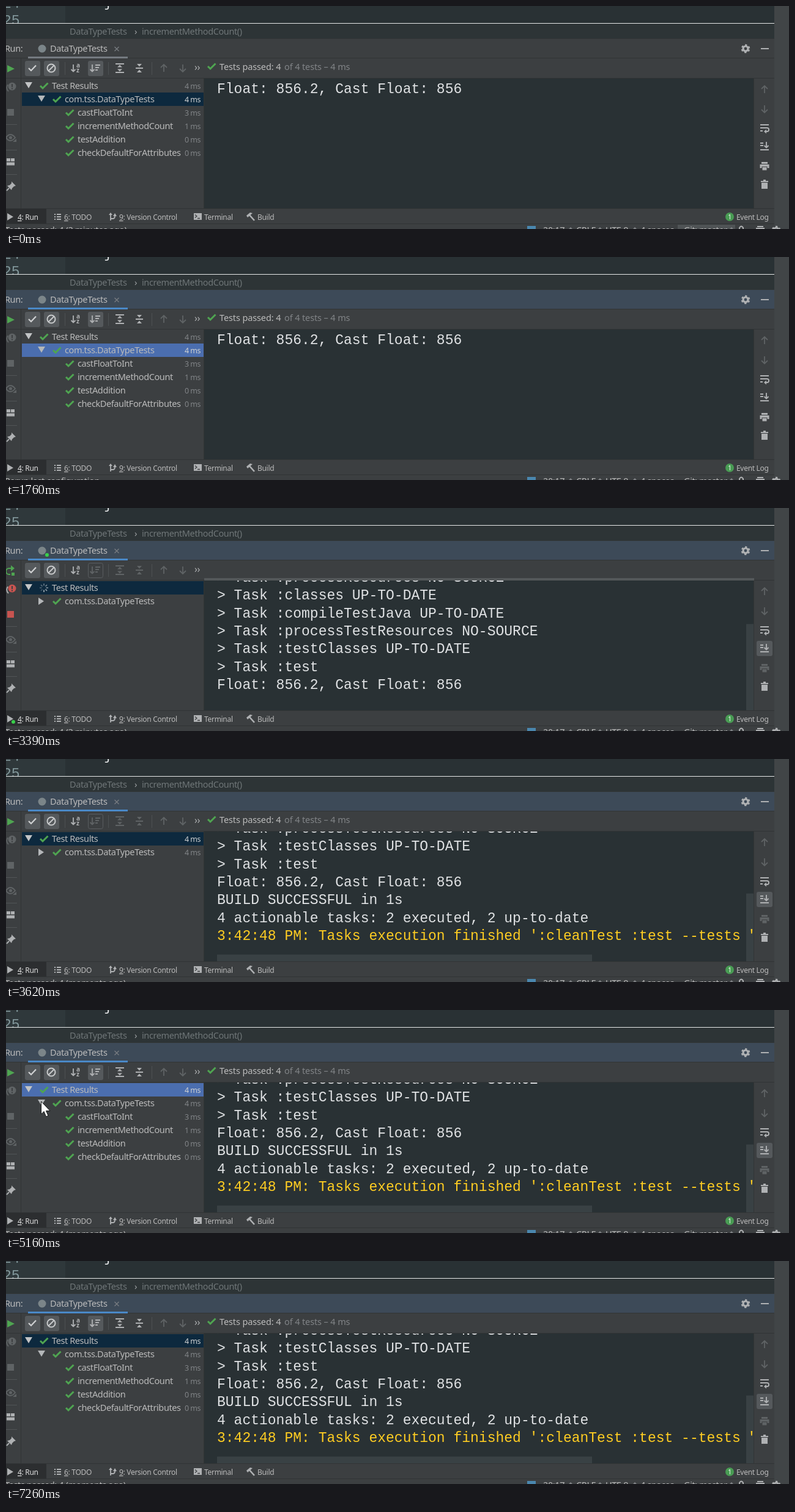
Write an HTML page that moves like this. It is 1280 px wide and 366 px high and loops after 7340 ms.

```html
<!DOCTYPE html>
<html lang="en">
<head>
<meta charset="utf-8">
<title>Test runner panel</title>
<style>
html, body { margin: 0; width: 100%; height: 100%; overflow: hidden; background: #3c3f41; }
svg { display: block; width: 1280px; height: 366px; }
text { font: 14.5px "Noto Sans", sans-serif; letter-spacing: -.4px; white-space: pre; }
.summary { letter-spacing: -.12px; }
.time { font-size: 12.5px; letter-spacing: -.5px; }
.tab { font-size: 12px; letter-spacing: -.3px; }
.mono { font: 23px "Liberation Mono", monospace; letter-spacing: 0; }
</style>
</head>
<body>
<svg id="stage" viewBox="0 0 1280 366" xmlns="http://www.w3.org/2000/svg"></svg>
<script>
const LOOP = 7340;
const PANEL = '#3c3f41', DARK = '#293134', EDGE = '#313435', TEXT = '#bbbbbb', DIM = '#818487';
const ICON = '#afb1b3', OFF = '#5f6365', GREEN = '#4fa551', RED = '#c75450', BLUE = '#4b6eaf', THUMB = '#394144';
const LINE = 29.4, VIEW = 215;

const rect = (x, y, w, h, fill, more = '') =>
  `<rect x="${x}" y="${y}" width="${w}" height="${h}" fill="${fill}" ${more}/>`;
const text = (x, y, s, fill = TEXT, more = '') => `<text x="${x}" y="${y}" fill="${fill}" ${more}>${s}</text>`;
const mono = (x, y, s, fill = '#e0e2e4') => text(x, y, s, fill, 'class="mono"');
const stroke = (d, color = ICON, w = 2) => `<path d="${d}" fill="none" stroke="${color}" stroke-width="${w}"/>`;
const fill = (d, color = ICON) => `<path d="${d}" fill="${color}"/>`;
const dot = (x, y, r, color) => `<circle cx="${x}" cy="${y}" r="${r}" fill="${color}"/>`;
const at = (x, y, s) => `<g transform="translate(${x} ${y})">${s}</g>`;
const check = (x, y) => at(x, y, stroke('M-6 0L-2 4L6.5-4.5', GREEN, 3));
const arrow = (x, y, dir, color) =>
  at(x, y, stroke(`M0 ${-6 * dir}V${5 * dir}M-5 ${dir}L0 ${6 * dir}L5 ${dir}`, color, 1.8));
const button = (x, y, w = 25) => rect(x, y, w, 25, '#55595c', 'rx="3"');
const gear = (x, y) => at(x, y,
  `<circle r="4" fill="none" stroke="${ICON}" stroke-width="3.2"/>` +
  `<circle r="6" fill="none" stroke="${ICON}" stroke-width="2.6" stroke-dasharray="3.14" transform="rotate(15)"/>`);

const LOG = [
  'Testing started at 3:42 PM ...',
  '&gt; Task :cleanTest',
  '&gt; Task :compileJava UP-TO-DATE',
  '&gt; Task :processResources NO-SOURCE',
  '&gt; Task :classes UP-TO-DATE',
  '&gt; Task :compileTestJava UP-TO-DATE',
  '&gt; Task :processTestResources NO-SOURCE',
  '&gt; Task :testClasses UP-TO-DATE',
  '&gt; Task :test',
  'Float: 856.2, Cast Float: 856',
  'BUILD SUCCESSFUL in 1s',
  '4 actionable tasks: 2 executed, 2 up-to-date',
  '3:42:48 PM: Tasks execution finished \':cleanTest :test --tests "com.tss.DataTypeTests"\'.'
];
const TESTS = [['castFloatToInt', 3], ['incrementMethodCount', 1], ['testAddition', 0], ['checkDefaultForAttributes', 0]];

// Step lists: the last entry whose time has come applies.
const COUNT = [[0, 0], [2220, 2], [2290, 4], [2370, 6], [2440, 8], [3160, 9], [3240, 10], [3400, 12], [3480, 13]];
const STATUS = [[0, 'Tests passed: 4 (3 minutes ago)'], [1130, 'Rerun last configuration'],
  [2610, 'Tests passed: 4 (3 minutes ago)'], [3560, 'Tests passed: 4 (moments ago)']];
const POINTER = [[0], [210, 1120, 290], [290, 1110, 131], [370],
  [4010, 60, 330], [4090, 36, 250], [4170, 18, 170], [4240, 8, 118], [4320, 4, 98], [4460, 6, 92],
  [4540, 14, 108], [4620, 24, 121], [4700, 30, 134], [4780, 42, 140], [4850, 52, 146], [4930, 57, 150],
  [5630, 95, 175], [5710, 230, 215], [5790, 400, 262], [5860, 560, 305], [5940, 700, 345], [6020]];
const pick = (list, t) => list.filter(k => k[0] <= t).pop();

function editor() {
  return rect(0, 0, 1280, 366, PANEL) + rect(0, 0, 1256, 53, DARK) + rect(0, 0, 97, 28, '#2f383b') +
    mono(-5, 3, '24', '#81969a') + mono(-5, 31, '25', '#81969a') + mono(160, 1, '}') +
    rect(0, 28, 1256, 25, '#2d3436') + rect(0, 28, 1256, 1, '#e6e8e8') +
    text(104, 47, 'DataTypeTests', '#6f7678') + text(210, 47, '›', '#a0a4a6') +
    text(222, 47, 'incrementMethodCount()', '#6f7678') +
    rect(1256, 0, 24, 366, '#414547') + rect(0, 53, 1256, 1, EDGE);
}

function header(active, running) {
  return rect(0, 54, 1256, 31, active ? '#3d4a58' : PANEL) + rect(0, 85, 1256, 1, EDGE) +
    rect(36, 83, 163, 3, active ? '#4a88c7' : '#747a80') +
    text(-2, 75, 'Run:') + dot(59, 70, 6.5, '#7b8589') + (running ? dot(67, 77, 3, '#39d04a') : '') +
    text(72, 75, 'DataTypeTests') + stroke('M177.5 67L184.5 74M184.5 67L177.5 74', '#787d81', 1.3) +
    gear(1209, 70) + rect(1234, 69, 13, 2, ICON);
}

function toolbar(running, ready) {
  const fold = ready ? ICON : OFF;
  const down = color => stroke('M0-6V5M-3.5 2L0 5.5L3.5 2', color, 1.8);
  const letter = (y, s) => text(115, y, s, ICON, 'style="font-size:10px;font-weight:600"');
  let s = button(31, 90) + button(62, 90) +
    (ready ? button(134, 90) : rect(134.5, 90.5, 24, 24, 'none', 'rx="3" stroke="#595d60"')) +
    at(43, 102, stroke('M-6 0L-2 4L6-4.5', '#d0d2d3', 2.2)) +
    at(74, 102, '<circle r="6.5" fill="none" stroke="#c8cacb" stroke-width="2"/>' + stroke('M-4.5 4.5L4.5-4.5', '#c8cacb')) +
    at(110, 102, down(ICON)) + letter(101, 'a') + letter(109, 'z') +
    at(141, 102, down(fold) + stroke('M5-5H13M5-1H11M5 3H9', fold, 1.8)) +
    at(186, 102, stroke('M-7-7H7M-7 7H7', fold) + fill('M-4-1.5L0-5.5L4-1.5ZM-4 1.5L0 5.5L4 1.5Z', fold)) +
    at(218, 102, stroke('M-6 0H6', fold) + fill('M-4-7H4L0-2.5ZM-4 7H4L0 2.5Z', fold)) +
    arrow(258, 102, -1, OFF) + arrow(289, 102, 1, OFF) + text(308, 106, '››', ICON, 'style="font-size:16px"');
  for (const x of [96, 167, 238]) s += rect(x, 92, 1, 21, '#4d5153');
  if (!running) s += check(336, 99) + text(349, 104.5, 'Tests passed: 4', TEXT, 'class="summary"') +
    text(455, 104.5, 'of 4 tests – 4 ms', DIM, 'class="summary"');
  return s;
}

function leftStrip(running) {
  const a = running ? RED : OFF;
  const run = running
    ? stroke('M10 99H5A4.5 4.5 0 0 0 5 109H7', GREEN) + fill('M8 94L14 99L8 104Z', GREEN) + rect(9, 106, 5, 5, GREEN)
    : fill('M2 97V109L14 103Z', GREEN);
  return rect(24, 86, 1, 246, EDGE) + run +
    dot(10, 132, 6.5, a) + rect(9, 128, 2, 5, PANEL) + rect(9, 134.5, 2, 2, PANEL) +
    stroke('M3 129Q-1 135 4 140', running ? ICON : OFF, 1.8) +
    rect(2, 169, 11, 11, a) + [194, 236, 276].map(y => rect(0, y, 18, 1, '#515557')).join('') +
    stroke('M0 216Q7 206 15 216Q7 226 0 216Z', OFF) + dot(7.5, 216, 2.5, OFF) + fill('M11 223H17L17 218Z', OFF) +
    rect(1, 250, 6, 5, ICON) + rect(8, 250, 6, 5, ICON) + rect(1, 256.5, 13, 5, ICON) +
    fill('M9 288L16 295L13 296L10 299L9 302L2 295L6 294L9 291Z') + stroke('M5 299L1 303', ICON, 1.8);
}

function spinner(t) {
  let s = '';
  const step = Math.floor(t / 90);
  for (let i = 0; i < 8; i++)
    s += `<path d="M0-3.5V-7" stroke="#a9b4bb" stroke-width="1.7" opacity="${.3 + ((i - step % 8 + 8) % 8) * .09}" transform="rotate(${i * 45})"/>`;
  return at(62, 131, s);
}

function tree(t, running) {
  const fresh = t >= 1990, waiting = fresh && t < 3240, open = !fresh || t >= 5160;
  const bright = fresh ? t >= 5160 && t < 7260 : t >= 1760;
  const time = (y, ms, on) => text(318, y, ms + ' ms', on ? '#d0d2d3' : DIM, 'text-anchor="end" class="time"');
  let s = rect(26, 119, 297, 213, PANEL) + rect(26, fresh ? 120 : 142, 297, 22, bright ? BLUE : '#0d293e') +
    fill('M31 125H43L37 135Z', '#c2c4c5');
  if (waiting) return s + spinner(t) + text(74, 136, 'Instantiating tests...');
  s += (running ? spinner(t) : check(62, 131)) + text(75, 136, 'Test Results') +
    fill(open ? 'M52 147H64L58 157Z' : 'M53 147V159L62 153Z', '#b4b7b9') +
    check(83, 153) + text(96, 158, 'com.tss.DataTypeTests');
  if (!running) s += time(136, 4, fresh) + time(158, 4, !fresh);
  if (open) TESTS.forEach(([name, ms], i) => {
    const y = 175 + 22 * i;
    s += check(104, y) + text(117, y + 5, name) + time(y + 5, ms);
  });
  return s;
}

function consoleView(t, running) {
  let lines = '';
  if (t < 1990) lines = mono(345, 142.5, LOG[9]);
  else {
    const n = pick(COUNT, t)[1], total = (n + 1) * LINE, shift = Math.max(0, total - VIEW);
    if (shift) lines += rect(1210, 119 + 213 * shift / total, 12, 213 * VIEW / total, THUMB);
    if (n == 13) lines += rect(345, 321, 613, 11, THUMB);
    for (let i = 0; i < n; i++) lines += mono(345, 141 + i * LINE - shift, LOG[i], i == 12 ? '#ffcd22' : undefined);
  }
  return rect(324, 119, 899, 213, DARK) + (running ? rect(324, 115, 899, 4, '#54585a') : '') +
    '<clipPath id="view"><rect x="324" y="119" width="898" height="213"/></clipPath>' +
    `<g clip-path="url(#view)">${lines}</g>`;
}

function rightStrip(fresh) {
  const print = fresh ? OFF : ICON;
  return rect(1222, 119, 1, 213, EDGE) + arrow(1240, 137, -1, OFF) + arrow(1240, 169, 1, OFF) +
    (fresh ? button(1227, 218, 26) : '') +
    at(1240, 200, stroke('M-7-5H7M-7 0H4Q7 0 7 3T4 6H2M-7 5H-3', ICON, 1.9) + fill('M-1 6L3 2.5V9.5Z')) +
    at(1240, 230, stroke('M-7-5H-2M-7-1H-2M-7 6H7', ICON, 1.9) + stroke('M3-7V2M-.5-1L3 2.5L6.5-1', ICON, 1.9)) +
    at(1240, 263, rect(-5, -7, 10, 3, print) + rect(-7.5, -3, 15, 6, print) + rect(-4, 1, 8, 6, print, `stroke="${PANEL}"`)) +
    at(1240, 293, rect(-6, -6, 12, 2, ICON) + rect(-2, -8, 4, 2, ICON) + fill('M-5-3H5V7H-5Z'));
}

function bottom(t, running) {
  const tab = (x, str, color = TEXT) => text(x, 351, str, color, 'class="tab"');
  const key = k => `<tspan text-decoration="underline">${k}</tspan>`;
  let s = rect(0, 332, 1256, 1, EDGE) + rect(0, 333, 1256, 25, PANEL) + rect(0, 333, 66, 24, '#2c2e30') + rect(0, 357, 1256, 1, EDGE) +
    fill('M2 340V352L12 346Z') + (running ? dot(12, 351, 3, '#39d04a') : '') +
    tab(19, key(4) + ': Run', '#e0e0e0') +
    stroke('M79 342H81M79 346H81M79 350H81M83 342H90M83 346H90M83 350H90', ICON, 1.9) + tab(95, key(6) + ': TODO') +
    stroke('M171 340V352M171 349H175Q178 349 178 344', ICON, 1.8) + fill('M168 343L171 339L174 343ZM175 345L178 340L181 345Z') +
    tab(185, key(9) + ': Version Control') +
    rect(307, 340, 13, 11, ICON) + stroke('M309 342.5L312 345L309 347.5M313 348.5H317', PANEL, 1.3) + tab(324, 'Terminal') +
    stroke('M398 343L406 352', ICON, 2.6) + fill('M393 344L399 339L403 340L395 347Z') + tab(411, 'Build') +
    dot(1183, 346, 7, '#499c54') + text(1183, 350, '1', '#fff', 'text-anchor="middle" style="font-size:10px"') + tab(1194, 'Event Log');
  if (t < 210) s += rect(1098, 359, 94, 7, '#4f5355');
  s += text(-2, 373, pick(STATUS, t)[1]) + rect(852, 361, 14, 5, '#4a87ae');
  [[878, '20:17'], [932, 'CRLF'], [980, 'UTF-8'], [1037, '4 spaces'], [1108, 'Git: master']]
    .forEach(([x, str]) => s += text(x, 373, str));
  for (const x of [923, 971, 1028, 1186]) s += fill(`M${x - 3} 366L${x} 363L${x + 3} 366Z`, DIM);
  return s + stroke('M1199 366V364Q1202 359 1205 364V366') + rect(1228, 361, 10, 2, ICON) + rect(1226, 364, 14, 2, ICON) + gear(1259, 368);
}

function pointer(t) {
  const [, x, y] = pick(POINTER, t);
  if (x === undefined) return '';
  if (x > 324) return at(x, y, stroke('M0 0H4Q6 0 6 2V20Q6 22 4 22H0M12 0H8Q6 0 6 2V20Q6 22 8 22H12', '#dfe1e2', 1.5));
  return at(x, y, '<path d="M.5 0V21L5 16.5L8.5 25L12 23.5L8.5 15.5H15Z" fill="#fff" stroke="#16191a"/>');
}

function draw(t) {
  const running = t >= 1990 && t < 3560, ready = t < 1990 || t >= 3700;
  return editor() + header(t >= 1760, running) + toolbar(running, ready) +
    rect(0, 118, 1256, 1, EDGE) + leftStrip(running) + tree(t, running) + rect(323, 119, 1, 213, EDGE) +
    consoleView(t, running) + rightStrip(t >= 1990) + bottom(t, running) + pointer(t);
}

const stage = document.getElementById('stage');
const begin = performance.now();
let shown = '';
function tick() {
  const next = draw((performance.now() - begin) % LOOP);
  if (next !== shown) stage.innerHTML = shown = next;
  requestAnimationFrame(tick);
}
tick();
</script>
</body>
</html>
```
